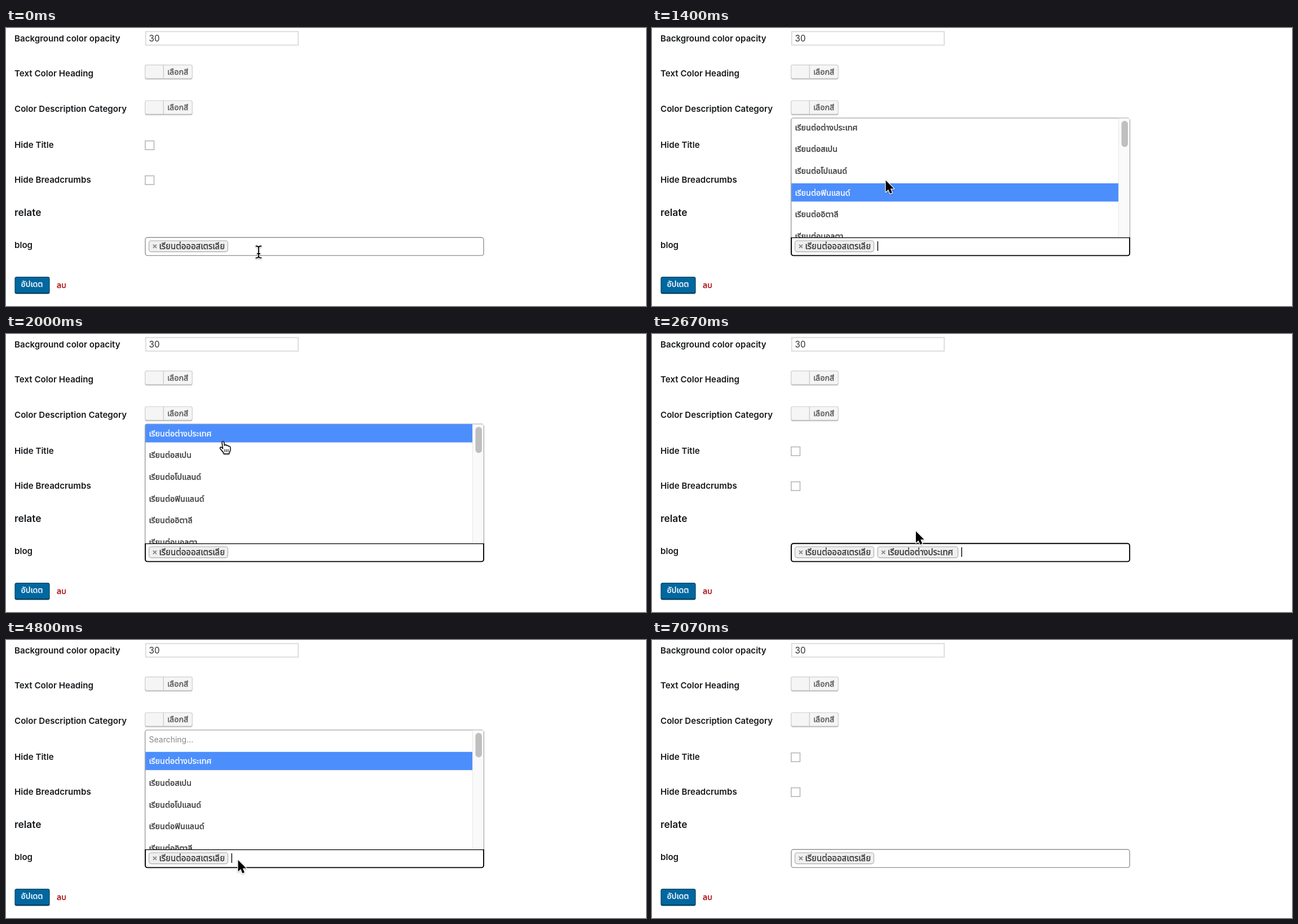
An HTML page that plays this animation: 1135 by 494 pixels, repeating every 7990 ms.

```html
<!DOCTYPE html>
<html lang="th">
<head>
<meta charset="utf-8">
<title>Category form</title>
<style>
  html, body { margin: 0; width: 100%; height: 100%; overflow: hidden; background: #fff; }
  svg { display: block; }
  text { font-family: Inter, "Noto Sans Thai", "Noto Sans", sans-serif; font-size: 14px; fill: #2a2e32; white-space: pre; }
  .label { font-size: 15.13px; font-weight: 600; fill: #16191c; }
  .heading { font-size: 17.4px; }
  .thai {
    font-family: "Noto Sans Thai Looped", "Noto Sans Thai", "Noto Sans", sans-serif;
    font-size: 14.35px; font-weight: 500; fill: currentColor; stroke: currentColor; stroke-width: .35px;
  }
  .chip { font-size: 15px; }
</style>
</head>
<body>
<svg id="stage" width="1135" height="494" viewBox="0 0 1135 494">
  <defs>
    <clipPath id="listClip"><rect x="246" y="159" width="602" height="213"/></clipPath>
    <filter id="soft" x="-50%" y="-50%" width="200%" height="200%">
      <feDropShadow dx="0" dy="1" stdDeviation="1" flood-opacity=".35"/>
    </filter>
  </defs>
  <g id="form"></g>
  <path id="field" fill="#fff"/>
  <g id="chips"></g>
  <rect id="caret" y="379" width="1.5" height="17" fill="#111"/>
  <g id="list" clip-path="url(#listClip)">
    <path d="M246.7 380V164a4 4 0 0 1 4-4H843.3a4 4 0 0 1 4 4V380" fill="#fff" stroke="#8c8c8c" stroke-width="1.2"/>
    <rect x="827" y="160.6" width="20" height="212" fill="#fafafa"/>
    <path d="M827.5 160.6V372" stroke="#e6e6e6"/>
    <rect id="thumb" x="832.5" y="165" width="11.5" rx="5.7" fill="#bfbfbf"/>
    <rect id="highlight" x="247.3" width="579.7" height="32.4" fill="#4d8efd"/>
    <g id="rows"></g>
  </g>
  <g id="loading">
    <path d="M246.7 372V338a4 4 0 0 1 4-4H843.3a4 4 0 0 1 4 4V372" fill="#fff" stroke="#8c8c8c" stroke-width="1.2"/>
    <text x="253.5" y="357" style="fill:#999">Searching…</text>
  </g>
  <g id="cursor" filter="url(#soft)">
    <path id="arrow" transform="translate(-.4 0) scale(1.1)" d="M0 0V18.6L4.2 14.6L7 21.4L10.3 20L7.5 13.4H13.2Z" stroke="#fff" stroke-width="2.2" paint-order="stroke" stroke-linejoin="round"/>
    <g id="hand" fill="#fff" stroke="#000" stroke-width="1.4" stroke-linejoin="round" stroke-linecap="round">
      <path d="M-1.9 1.6C-1.9-.6 1.3-.6 1.6 1.6L2.6 7.4C3 6 3 6.2 3.4 6.2C4.6 5.4 6 6 6.3 7.6C7.4 6.6 9.2 7.1 9.5 8.8C10.8 8 12.9 8.6 12.9 11V14.6C12.9 17.6 10.8 18.8 10.5 22H1.4C1 18.8-2.2 16.6-4.8 13.2C-6.6 10.6-4 9-2 11.2L-.4 12.8Z"/>
      <path d="M3 14V18.4M6 14V18.4M9 14V18.4" stroke-width="1.1"/>
    </g>
    <g id="beam" fill="none" stroke-linecap="round">
      <path d="M-4.5-10.5Q0-10.5 0-7.5Q0-10.5 4.5-10.5M0-7.5V7.5M-4.5 10.5Q0 10.5 0 7.5Q0 10.5 4.5 10.5M-2.2 3H2.2" stroke="#fff" stroke-width="3.4"/>
      <path d="M-4.5-10.5Q0-10.5 0-7.5Q0-10.5 4.5-10.5M0-7.5V7.5M-4.5 10.5Q0 10.5 0 7.5Q0 10.5 4.5 10.5M-2.2 3H2.2" stroke="#000" stroke-width="1.8"/>
    </g>
  </g>
</svg>
<script>
const LOOP = 7990;
const ROW = { top: 160.2, height: 32.4, pitch: 38.6 };
const STUDY = 'เรียนต่อ';
const COUNTRIES = ['ต่างประเทศ', 'สเปน', 'โปแลนด์', 'ฟินแลนด์', 'อิตาลี', 'มอลตา'];

const $ = id => document.getElementById(id);
const show = (id, on) => $(id).setAttribute('display', on ? 'inline' : 'none');
const set = (id, attrs) => {
  for (const key in attrs) $(id).setAttribute(key, attrs[key]);
};
const label = (text, y, extra = '') => `<text class="label ${extra}" x="15" y="${y}">${text}</text>`;
const thai = (text, x, y, color = '#333', extra = '') =>
  `<text class="thai ${extra}" x="${x}" y="${y}" style="color:${color}">${text}</text>`;

const colorButton = y => `
  <rect x="246.5" y="${y + 1}" width="84" height="25.5" rx="3" fill="#bdbdbd"/>
  <rect x="246.7" y="${y + .6}" width="83.6" height="24" rx="3" fill="#f5f5f5" stroke="#cfcfcf" stroke-width="1.2"/>
  <path d="M279.3 ${y + .6}v24" stroke="#c6c6c6" stroke-width="1.2"/>
  ${thai('เลือกสี', 286, y + 18, '#555')}`;

const checkbox = y =>
  `<rect x="246.9" y="${y}" width="15.6" height="15.6" fill="#fff" stroke="#b0b3b6" stroke-width="1.5"/>`;

const chip = (x, width, text) => `
  <rect x="${x}" y="378" width="${width}" height="19.6" rx="4" fill="#efefef" stroke="#aaa" stroke-width="1.1"/>
  <path d="M${x + 7.4} 384.8l6 6m0-6l-6 6" stroke="#888" stroke-width="1.9"/>
  ${thai(STUDY + text, x + 18, 392.5, '#333', 'chip')}`;

$('form').innerHTML = [
  label('Background color opacity', 24),
  label('Text Color Heading', 86),
  label('Color Description Category', 149.3),
  label('Hide Title', 213),
  label('Hide Breadcrumbs', 275),
  label('relate', 333.5, 'heading'),
  label('blog', 391.2),
  '<rect x="247.8" y="6.4" width="270.5" height="24" fill="#fff" stroke="#d6d6d6" stroke-width="1.6"/>',
  '<text x="253.5" y="24" style="font-size:15.2px">30</text>',
  colorButton(65), colorButton(128.4),
  checkbox(200.6), checkbox(262.6),
  '<rect x="15.4" y="442" width="62.2" height="30.5" rx="3.5" fill="#00405f"/>',
  '<rect x="16.6" y="443.2" width="59.8" height="26.8" rx="2.5" fill="#0067a0"/>',
  thai('อัปเดต', 26.5, 460.3, '#fff'),
  thai('ลบ', 90, 461.5, '#a00')
].join('');

$('chips').innerHTML = chip(253.5, 140, 'ออสเตรเลีย') +
  `<g id="added">${chip(400, 142.6, COUNTRIES[0])}</g>`;

$('rows').innerHTML = '<text id="searching" x="253.5" y="182" style="fill:#888">Searching...</text>' +
  COUNTRIES.map(name => thai(STUDY + name, 253.5, 0)).join('');
const options = [...$('rows').querySelectorAll('.thai')];

// Pointer path: time, x, y
const PATH = [
  [0, 448, 398], [800, 448, 398], [1070, 437, 318], [1270, 437, 318],
  [1400, 415, 271], [1800, 391, 204], [2000, 385, 191], [2270, 383, 184],
  [2600, 440, 330], [2800, 520, 388], [3000, 574, 392], [3250, 574, 392],
  [3600, 405, 386], [3730, 402, 384], [4000, 407, 387], [4400, 411.5, 390],
  [4530, 412, 391], [5000, 412, 391], [5730, 369, 385], [5870, 367, 384],
  [5940, 368, 386], [6400, 414, 454], [LOOP, 414, 454]
];

function pointerAt(t) {
  const i = PATH.findIndex(p => p[0] > t);
  const [t0, x0, y0] = PATH[i - 1], [t1, x1, y1] = PATH[i];
  const k = (t - t0) / (t1 - t0);
  return [x0 + (x1 - x0) * k, y0 + (y1 - y0) * k];
}

const between = (t, a, b) => t >= a && t < b;
const CARET_RESETS = [330, 2270, 4200, 4670, 5870];

function fieldPath(corner) {
  const top = 372.2, bottom = 404.4, left = 247, right = 847.1;
  return `M${left + corner} ${top}H${right - corner}a${corner} ${corner} 0 0 1 ${corner} ${corner}` +
    `V${bottom - 4}a4 4 0 0 1-4 4H${left + 4}a4 4 0 0 1-4-4` +
    `V${top + corner}a${corner} ${corner} 0 0 1 ${corner} ${-corner}Z`;
}

function render(t) {
  const [x, y] = pointerAt(t);
  const loading = between(t, 530, 730);
  const firstOpen = between(t, 730, 2270);
  const secondOpen = between(t, 4670, 5870);
  const open = firstOpen || secondOpen;
  const focused = between(t, 330, 6330);
  const added = between(t, 2270, 4200);

  set('field', {
    d: fieldPath(open || loading ? 0 : 4),
    stroke: focused ? '#000' : '#919191',
    'stroke-width': focused ? 1.9 : 1.4
  });
  show('added', added);

  const reset = CARET_RESETS.filter(r => r <= t).pop();
  show('caret', focused && (t - reset) % 1000 < 500);
  set('caret', { x: added ? 548.5 : 399.6 });

  show('loading', loading);
  show('list', open);
  const searching = between(t, 4670, 5000);
  const shift = searching ? 1 : 0;
  const inList = firstOpen && y < 372;
  const active = inList ? Math.max(0, Math.ceil((y - ROW.top - ROW.height) / ROW.pitch)) : shift;
  show('searching', searching);
  set('thumb', { height: searching ? 43.5 : 46.5 });
  set('highlight', { y: ROW.top + ROW.pitch * active });
  options.forEach((option, i) => {
    option.setAttribute('y', 181.7 + ROW.pitch * (i + shift));
    option.style.color = i + shift === active ? '#fff' : '#333';
  });

  const overRow = inList && y >= ROW.top + ROW.pitch * active;
  const beam = t < 1000 && !inList;
  show('beam', beam);
  show('hand', overRow);
  show('arrow', !beam && !overRow);
  set('cursor', {
    transform: `translate(${x} ${y})`,
    opacity: Math.min(1, Math.max(0, (7070 - t) / 250))
  });
}

const start = performance.now();
function tick() {
  render((performance.now() - start) % LOOP);
  requestAnimationFrame(tick);
}
tick();
</script>
</body>
</html>
```
